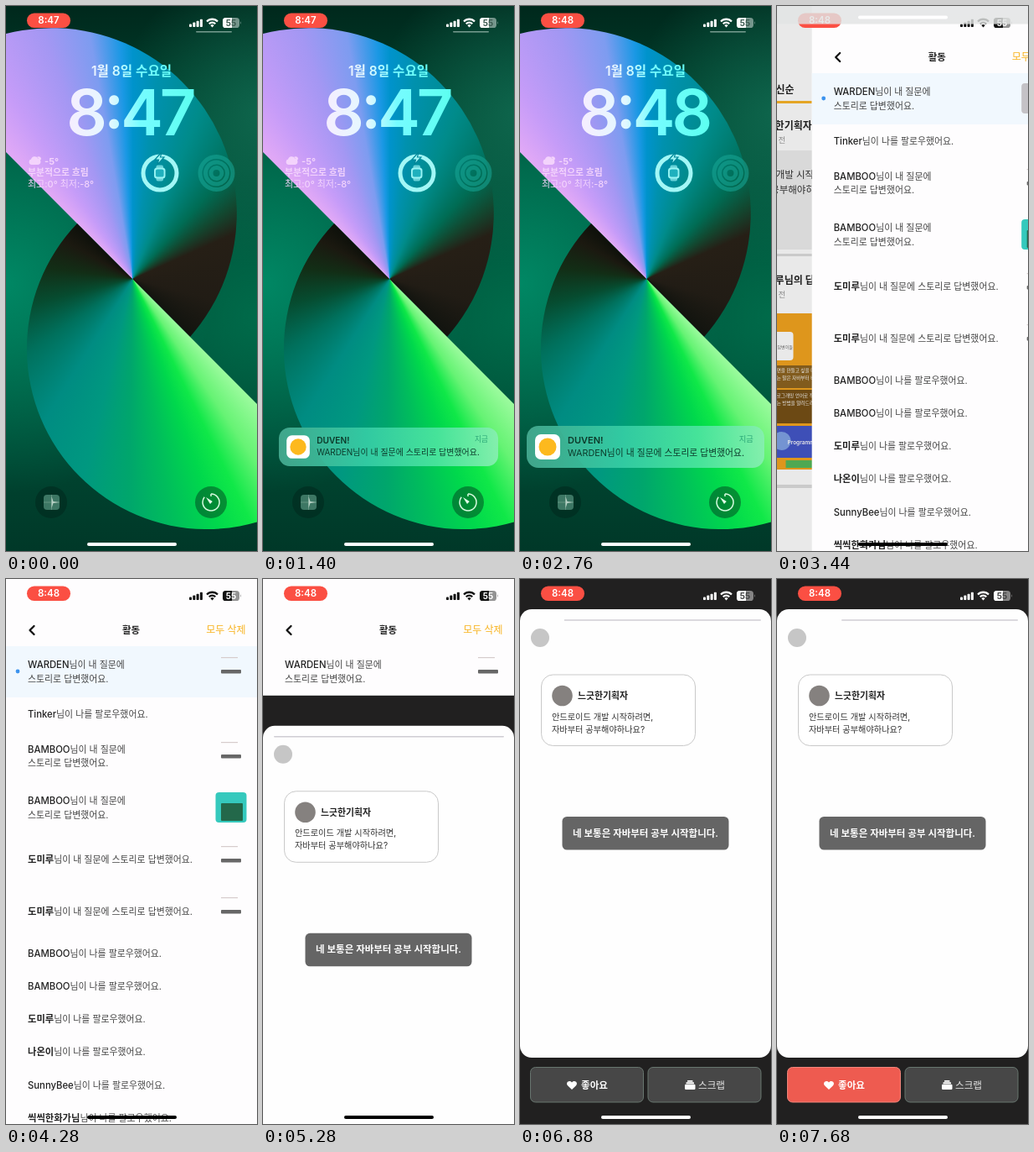
These frames come from a looping animation (300 by 649 pixels, 7.72 s). An HTML page:

```html
<!DOCTYPE html>
<html lang="ko">
<head>
<meta charset="utf-8">
<title>Story reply notification</title>
<style>
  html, body { margin: 0; width: 100%; height: 100%; overflow: hidden; background: #fff; }
  #stage { position: relative; width: 300px; height: 649px; overflow: hidden; }
  #stage svg, #lock, #wall, #wall i { position: absolute; left: 0; top: 0; width: 300px; height: 649px; }
  svg text { font-family: Inter, "Noto Sans CJK KR", "Noto Sans CJK", sans-serif; white-space: pre; }
  .clock text { font-feature-settings: "case"; }
  #veil { position: absolute; inset: 0; background: #ededed; }
  #wall {
    background:
      radial-gradient(circle at 0 330px, rgba(0,138,102,.95), transparent 250px),
      radial-gradient(circle at 310px 130px, rgba(16,106,80,.9), transparent 180px),
      radial-gradient(circle at 300px 370px, rgba(0,110,76,.85), transparent 160px),
      linear-gradient(#00281c, #00523a 30%, #00563c 60%, #003828);
  }
  .upper {
    clip-path: path("M-92 82 A221 221 0 0 1 220 394 Z");
    background: conic-gradient(at 151.5px 325px,
      #0093cc 0deg, #0091ae 7deg, #008b8a 22deg, #006c54 42deg, #124830 54deg, #261f16 66deg,
      #211c15 105deg, #12140f 135deg, #e2a9f6 315deg, #c69cf8 326deg, #a497f3 340deg, #7d9cf0 350deg,
      #1a98e4 357deg, #0093cc 360deg);
  }
  .lower {
    clip-path: path("M85 259 A215 215 0 0 0 389 563 Z");
    background: conic-gradient(at 151.5px 325px,
      #9dfb9f 135deg, #66f374 146deg, #10e848 154deg, #00d84c 161deg, #00bd5c 171deg, #00a66c 181deg,
      #009880 194deg, #008c82 212deg, #00705c 235deg, #064c30 256deg, #122e16 277deg, #1b1910 299deg, #0d100a 315deg);
  }
</style>
</head>
<body>
<div id="stage">
  <svg id="app" viewBox="0 0 300 649"></svg>
  <div id="lock">
    <div id="veil"></div>
    <div id="face">
      <div id="wall"><i class="upper"></i><i class="lower"></i></div>
      <svg id="cover" viewBox="0 0 300 649"></svg>
    </div>
    <svg viewBox="0 0 300 649"><rect x="97" y="639" width="107" height="4" rx="2" fill="#fff"/></svg>
  </div>
</div>
<script>
const LOOP = 7720;
const $ = id => document.getElementById(id);
const clamp = v => Math.min(1, Math.max(0, v));
const span = (t, start, length) => clamp((t - start) / length);
const easeOut = p => 1 - (1 - p) ** 3;
const easeInOut = p => p < .5 ? 4 * p ** 3 : 1 - (2 - 2 * p) ** 3 / 2;
const move = (id, x, y) => $(id).setAttribute('transform', `translate(${x} ${y})`);

const text = (x, y, size, str, fill = '#222', weight = 400, extra = '') =>
  `<text x="${x}" y="${y}" font-size="${size}" fill="${fill}" font-weight="${weight}" ${extra}>${str}</text>`;
const rect = (x, y, w, h, fill, rx = 0, extra = '') =>
  `<rect x="${x}" y="${y}" width="${w}" height="${h}" rx="${rx}" fill="${fill}" ${extra}/>`;
const circle = (x, y, r, fill, extra = '') => `<circle cx="${x}" cy="${y}" r="${r}" fill="${fill}" ${extra}/>`;
const path = (d, fill, extra = '') => `<path d="${d}" fill="${fill}" ${extra}/>`;
const MID = 'text-anchor="middle"';

function statusBar(digits) {
  const bars = [0, 1, 2, 3].map(i =>
    rect(219 + i * 4.3, 21.5 - i * 1.9, 3, 3.5 + i * 1.9, 'currentColor', .8)).join('');
  const arc = (r, w) => {
    const d = r * .72;
    return path(`M${246.5 - d} ${25 - d}A${r} ${r} 0 0 1 ${246.5 + d} ${25 - d}`, 'none',
      `stroke="currentColor" stroke-width="${w}"`);
  };
  return rect(25, 8.5, 52, 17.5, '#fb4f43', 8.7) +
    `<g class="clock">${text(51, 21.3, 11.5, '8:47', '#fff', 600, MID)}</g>` + bars +
    arc(9, 2.3) + arc(5.2, 2.2) + path('M246.5 25.5l-2.2-2.6q2.2-1.6 4.4 0z', 'currentColor') +
    rect(259, 14, 20, 12, 'currentColor', 3.6, 'opacity=".45"') +
    path('M262.6 14H270V26H262.6A3.6 3.6 0 0 1 259 22.4V17.6A3.6 3.6 0 0 1 262.6 14z', 'currentColor') +
    path('M280 18q1.6 2 0 4z', 'currentColor', 'opacity=".5"') +
    text(269, 23.7, 10, '55', digits, 700, MID + ' class="level"');
}

// Lock screen
function lockFace() {
  const tint = 'url(#tint)';
  const ring = (x, r, w, color) => circle(x, 199, r, 'none', `stroke="${color}" stroke-width="${w}"`);
  const weather = '#f3d3fc';
  return `<defs>
    <linearGradient id="tint" gradientUnits="userSpaceOnUse" x1="76" x2="226" y1="0" y2="0">
      <stop stop-color="#f5eeff"/><stop offset=".33" stop-color="#e2f8ff"/>
      <stop offset=".56" stop-color="#76fcff"/><stop offset="1" stop-color="#5cfff0"/></linearGradient>
    <linearGradient id="glass">
      <stop stop-color="#45aa90"/><stop offset=".4" stop-color="#34cca4"/>
      <stop offset=".72" stop-color="#4ae49e"/><stop offset="1" stop-color="#86efb0"/></linearGradient></defs>
    <g color="#fff">${statusBar('#3c5a50')}</g>` +
    rect(227, 30, 43, 1.6, '#a9c4ba', .8, 'opacity=".7"') +
    text(150, 82.5, 15.6, '1월 8일 수요일', tint, 600, MID) +
    `<g class="clock">${text(148, 154, 76, '8:47', tint, 600, MID + ' letter-spacing="-4"')}</g>` +
    path('M30 189a3.3 3.3 0 0 1 0-6.4 4.4 4.4 0 0 1 8.2-.9 3.7 3.7 0 0 1 .2 7.3zM37 180a3 3 0 0 1 5 2.6l-1.7 1.4-2-3z', weather) +
    text(46, 188.5, 11, '-5°', weather, 700) +
    text(26, 202, 10.9, '부분적으로 흐림', weather, 600) +
    text(26, 216, 11, '최고:0° 최저:-8°', weather, 500) +
    ring(184, 20, 5, '#a2f7f6') +
    path('M186 174l-8 9h4.5l-1.5 6 8-9h-4.5z', '#a2f7f6', 'stroke="#00889a" stroke-width="1.2"') +
    rect(179.5, 189.5, 8.5, 19, '#68d2d8', 2) +
    rect(177, 192.5, 13.5, 13, '#98f4f4', 3.5) + rect(178.9, 194.4, 9.7, 9.2, '#1fb0bd', 2.2) +
    [19.5, 13, 6.5].map(r => ring(251.5, r, 5, 'rgba(24,168,152,.55)')).join('') +
    circle(54, 591, 19, 'rgba(0,35,25,.45)') + circle(245, 591, 19, 'rgba(0,45,25,.45)') +
    rect(45, 582, 19, 18, '#3d7764', 4) +
    path('M45 591H64M54.5 582V600', 'none', 'stroke="#6c9c8a" stroke-width=".8"') +
    path('M54.5 584v14l2-6 7-1-7-1z', '#b7d1c5') +
    path('M245 581A10 10 0 1 1 237.2 584.8', 'none', 'stroke="#d8fbe0" stroke-width="1.5"') +
    path('M239 585l7.8 5-2.8 3z', '#e2ffe8') + path('M245 581v3', 'none', 'stroke="#d8fbe0" stroke-width="1.5"') +
    `<g id="note">${rect(8, 500, 284, 50, 'url(#glass)', 14, 'opacity=".94"')}
      ${rect(18, 510, 30, 30, '#fff', 7)}${circle(33, 525, 10.5, '#fdb91e')}
      ${text(57, 521, 11, 'DUVEN!', '#0c3a2a', 600)}
      ${text(57, 535.5, 10.8, 'WARDEN님이 내 질문에 스토리로 답변했어요.', '#0c3b2b')}
      ${text(279, 519, 9.4, '지금', '#2aa777', 400, 'text-anchor="end"')}</g>`;
}

// App: feed behind the pushed page
function feed() {
  const lines = ['화면을 만들고 싶을 때에도 쓸 수', '있는 말은 자바부터 배우면 됩니다', '프로그래밍 언어로 작업할 수', '있는 방법을 알려드려요'];
  return rect(0, 0, 390, 649, '#fff') +
    text(65, 103.5, 12, '최신순', '#222', 600) + rect(0, 113, 150, 3, '#f9b529') + rect(150, 115, 240, 1, '#ddd') +
    text(53, 147, 12, '느긋한기획자', '#222', 600) + text(53, 163, 9.5, '2시간 전', '#999') +
    rect(12, 172, 276, 118, '#ededed', 6) +
    text(20, 205, 11.5, '안드로이드 개발 시작하려면,', '#333') +
    text(24, 223, 11.5, '자바부터 공부해야하나요?', '#333') +
    rect(0, 295, 390, 3, '#ddd') +
    text(53, 331, 12, '도미루님의 답변', '#222', 600) + text(53, 347, 9.5, '3시간 전', '#999') +
    rect(12, 366, 276, 186, '#f3a41f') + rect(30, 388, 67, 34, '#fff', 4) +
    text(78, 408, 5, '답변이들', '#666') +
    rect(12, 428, 276, 27, '#8d6420') + rect(12, 457, 276, 40, '#765016') +
    lines.map((s, i) => text(72, 436 + i * 9 + (i > 1 ? 12 : 0), 5.6, s, '#fff', 500)).join('') +
    rect(12, 500, 276, 38, '#4456c8') + circle(83, 518, 11, '#7fa2e6') +
    text(90, 522, 6.5, 'Programme', '#fff', 600) + rect(88, 541, 200, 9, '#55b85a') + rect(0, 570, 390, 4, '#ddd');
}

function activity() {
  const story = '님이 내 질문에', reply = '스토리로 답변했어요.', follow = '님이 나를 팔로우했어요.';
  const row = (y, name, rest) =>
    text(26, y, 10.9, `<tspan font-weight="${/[A-Z]/.test(name) ? 500 : 700}" font-size="11.3" fill="#222">${name}</tspan>${rest}`, '#444');
  const twoLine = (y, name) => row(y, name, story) + text(26, y + 16.5, 10.9, reply, '#444');
  const miniStory = y => rect(257, y - 13, 20, 1.2, '#d6cccc') + rect(257, y + 2, 24, 4.5, '#676767', 1);
  const follows = ['BAMBOO', 'BAMBOO', '도미루', '나온이', 'SunnyBee', '씩씩한화가님'];
  return rect(0, 0, 300, 649, '#fefdfe') +
    path('M33.5 56l-5 5 5 5', 'none', 'stroke="#111" stroke-width="2.3" stroke-linecap="round" stroke-linejoin="round"') +
    text(149.5, 65, 11.4, '활동', '#222', 600, MID) +
    text(286.5, 65, 12, '모두 삭제', '#f8b31f', 500, 'text-anchor="end"') +
    `<g id="unread">${rect(0, 80, 300, 61, '#f1f8fe')}${circle(14, 110, 2.4, '#3c93ee')}</g>` +
    twoLine(106, 'WARDEN') + `<g id="loaded">${miniStory(106)}</g>` +
    rect(250.5, 92, 37, 36, '#c4c2c6', 4, 'id="pending"') +
    row(164.5, 'Tinker', follow) + twoLine(206.5, 'BAMBOO') + miniStory(207) +
    twoLine(268, 'BAMBOO') + rect(250.5, 254, 37, 36, '#35c9bd', 4) + rect(257, 267, 26, 21, '#23684a', 1) +
    row(338, '도미루', story + ' ' + reply) + miniStory(331) +
    row(399.5, '도미루', story + ' ' + reply) + miniStory(392) +
    follows.map((name, i) => row(449.5 + i * 39.25, name, follow)).join('');
}

function storyPage() {
  const edge = 'stroke="#68766f" stroke-width="1"';
  return rect(0, 0, 300, 649, '#212020') + rect(0, 36, 300, 534, '#fefefe', 14) +
    rect(13, 48.2, 275, 1.5, '#cfcdd3', .7, 'id="progress"') + circle(24, 70, 11, '#c6c6c6') +
    rect(25.5, 114, 184, 84.5, '#fff', 14, 'stroke="#c9c9c9"') +
    circle(50.5, 139, 12.3, '#85817f') + text(69, 143, 10.9, '느긋한기획자', '#222', 600) +
    text(38, 167.5, 10.2, '안드로이드 개발 시작하려면,', '#333') +
    text(38, 182.5, 10.2, '자바부터 공부해야하나요?', '#333') +
    rect(50.5, 283, 199, 39.5, '#656565', 5.5) +
    text(150, 306.5, 11.5, '네 보통은 자바부터 공부 시작합니다.', '#fff', 600, MID) +
    rect(12.5, 581.5, 135, 41.5, '#474747', 6, edge + ' id="like"') + rect(153, 581.5, 135, 41.5, '#474747', 6, edge) +
    path('M62 608l-5-4.8c-3-3.2 1.6-7.6 5-3.7 3.4-3.9 8 .5 5 3.7z', '#fff') +
    text(73, 606.5, 11.6, '좋아요', '#fff', 600) +
    rect(200, 597, 6.5, 1.8, '#fff', .6) + rect(198.5, 599.3, 9.5, 2, '#fff', .6) +
    rect(197, 601.8, 12.5, 6.3, '#fff', 1.3) +
    text(213, 606.5, 11.6, '스크랩', '#e6e6e6', 500);
}

$('app').innerHTML =
  `<g id="feed">${feed()}</g>` + rect(0, 0, 300, 649, '#000', 0, 'id="dim"') +
  `<g id="activity">${activity()}</g><g id="story">${storyPage()}</g>` +
  `<g id="status">${statusBar('#fff')}</g>` + rect(97, 639, 107, 4, '#000', 2, 'id="homeBar"');
$('cover').innerHTML = lockFace();

const clocks = document.querySelectorAll('.clock text');
const appLevel = document.querySelector('#status .level');
const show = (id, on) => $(id).style.display = on ? '' : 'none';

function draw(t) {
  clocks.forEach(node => node.textContent = t < 2100 ? '8:47' : '8:48');

  const arrive = span(t, 1240, 442);
  const scale = .7 + .3 * easeOut(arrive);
  $('note').setAttribute('transform', `translate(150 525) scale(${scale}) translate(-150 -525)`);
  $('note').style.opacity = clamp(arrive * 3);

  const lift = easeInOut(span(t, 2980, 578));
  $('lock').style.transform = `translateY(${-649 * lift}px)`;
  $('lock').style.visibility = lift < 1 ? 'visible' : 'hidden';
  $('face').style.opacity = 1 - lift;
  $('veil').style.opacity = 1 - .2 * lift;

  const push = easeOut(span(t, 3160, 583));
  move('feed', -90 * push, 0);
  $('dim').setAttribute('opacity', .1 * push);
  move('activity', 300 * (1 - push), 0);
  show('unread', t < 4960);
  show('pending', t < 3600);
  show('loaded', t >= 3600);

  const sheetY = 649 * (1 - easeOut(span(t, 5080, 500)));
  move('story', 0, sheetY);
  const onDark = sheetY < 10;
  $('status').setAttribute('color', onDark ? '#fff' : '#111');
  appLevel.setAttribute('fill', onDark ? '#444' : '#fff');

  const done = Math.max(0, t - 5580) * .0305;
  $('progress').setAttribute('x', 13 + done);
  $('progress').setAttribute('width', 275 - done);
  $('like').setAttribute('fill', t < 6900 ? '#474747' : '#ee5b50');
  $('like').setAttribute('stroke', t < 6900 ? '#68766f' : '#f0867c');
  const shade = Math.round(255 * span(t, 5600, 750));
  $('homeBar').setAttribute('fill', `rgb(${shade},${shade},${shade})`);
}

const began = performance.now();
function tick() {
  draw((performance.now() - began) % LOOP);
  requestAnimationFrame(tick);
}
tick();
</script>
</body>
</html>
```
